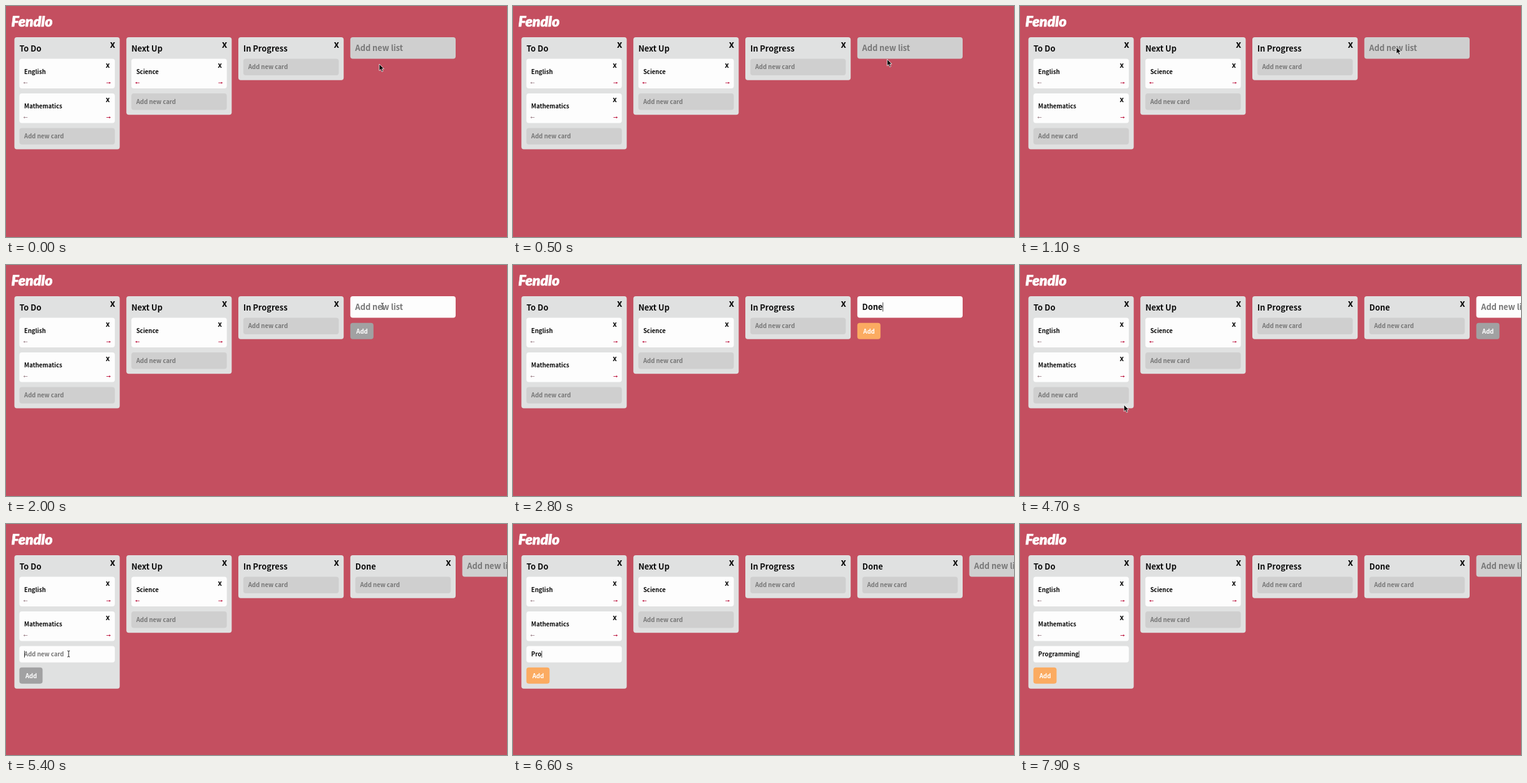
These frames come from a looping animation (800 by 370 pixels, 8 s). An HTML page:

```html
<!DOCTYPE html>
<html lang="en">
<head>
<meta charset="utf-8">
<title>Task board</title>
<style>
  html, body { margin: 0; width: 100%; height: 100%; overflow: hidden; background: #c44f60; }
  svg { display: block; width: 800px; height: 370px; }
  text { font-family: "Noto Sans CJK JP", "Noto Sans CJK SC", "Noto Sans CJK", "Open Sans", sans-serif; font-weight: 700; white-space: pre; }
  .logo { font: italic 900 23px Lato, sans-serif; fill: #fff; stroke: #fff; stroke-width: .7; stroke-linejoin: round; }
</style>
</head>
<body>
<svg id="stage" viewBox="0 0 800 370" xmlns="http://www.w3.org/2000/svg"></svg>
<script>
const LOOP = 8000, STEP = 100;
const LEFT = 13.4, PITCH = 178.8, WIDTH = 168.2;
const BIG = 12.8, SMALL = 9.55;
const INK = '#0b0b0b', HINT = '#777';
const FAMILY = '"Noto Sans CJK JP", "Noto Sans CJK SC", "Noto Sans CJK", "Open Sans", sans-serif';

const FOCUS_LIST = 1400, SUBMIT = 3100, FOCUS_CARD = 5100;
const LIST_KEYS = [2200, 2400, 2500, 2700];
const CARD_KEYS = [6200, 6400, 6600, 6700, 6800, 7000, 7100, 7300, 7400, 7500, 7700];

// time, x, y of the pointer
const PATH = [
  [0, 596, 93], [300, 596, 93], [1000, 601, 66], [3900, 601, 66],
  [4700, 166, 224], [5000, 100, 208], [8000, 100, 208]
];

const stage = document.getElementById('stage');
const ruler = document.createElement('canvas').getContext('2d');

const rect = (x, y, w, h, fill, r = 4) =>
  `<rect x="${x}" y="${y}" width="${w}" height="${h}" rx="${r}" fill="${fill}"/>`;
const label = (x, y, str, size, fill = INK, anchor = 'start') =>
  `<text x="${x}" y="${y}" font-size="${size}" fill="${fill}" text-anchor="${anchor}">${str}</text>`;
const line = (d, color, width = 1) =>
  `<path d="${d}" fill="none" stroke="${color}" stroke-width="${width}"/>`;

function measure(str, size) {
  ruler.font = `700 ${size}px ${FAMILY}`;
  return ruler.measureText(str).width;
}

const typed = (word, keys, t) => word.slice(0, keys.filter(k => k <= t).length);

// The caret restarts its blink at the last focus or key press.
function caretOn(t, start, keys) {
  const last = Math.max(start, ...keys.filter(k => k <= t));
  return t >= start && (t - last) % 1000 < 500;
}

function arrow(x, y, dir, color) {
  return line(`M${x - 3.2 * dir} ${y}H${x + 3 * dir}`, color, .9) +
    `<path d="M${x + 3.5 * dir} ${y}l${-2.3 * dir} -1.7v3.4z" fill="${color}"/>`;
}

function addButton(x, y, active) {
  return rect(x, y, 37, 26, active ? '#fbab61' : '#a1a1a2') +
    label(x + 9.5, y + 16.8, 'Add', SMALL, '#fff');
}

function field(x, y, w, h, size, hint, box) {
  const base = y + h / 2 + size * .37, text = box.text || '';
  let out = rect(x, y, w, h, box.focus ? '#fdfdfd' : '#cfcfcf') +
    label(x + 7.7, base, text || hint, size, text ? INK : HINT);
  if (box.caret) {
    const cx = x + 8.1 + measure(text, size);
    out += line(`M${cx} ${base - size * .95}V${base + size * .2}`, '#333', .9);
  }
  return out;
}

function card(x, y, title, first) {
  return rect(x, y, 152.4, 47.5, '#fdfdfd') +
    label(x + 7.7, y + 24.4, title, SMALL) +
    label(x + 141.2, y + 14.4, 'x', 11.6, INK, 'middle') +
    arrow(x + 9.8, y + 38.5, -1, first ? '#a58c93' : '#bd1740') +
    arrow(x + 142.2, y + 38.5, 1, '#bd1740');
}

function list(i, title, cards, box = {}) {
  const x = LEFT + i * PITCH, inner = x + 8, y = 84.6 + cards.length * 55.4;
  let out = rect(x, 50, WIDTH, y - 50 + 34.2 + (box.focus ? 34.2 : 0), '#e0e1e1') +
    label(x + 8, 72.8, title, BIG) +
    label(x + 156.7, 67, 'x', 15, INK, 'middle');
  cards.forEach((name, n) => out += card(inner, 84.6 + n * 55.4, name, i === 0));
  out += field(inner, y, 152.4, 26.4, SMALL, 'Add new card', box);
  if (box.focus) out += addButton(inner, y + 34.4, box.text);
  return out;
}

function newList(i, box) {
  const x = LEFT + i * PITCH;
  return field(x, 50, WIDTH, 34.5, BIG, 'Add new list', box) +
    (box.focus ? addButton(x, 92.7, box.text) : '');
}

function pointer(t) {
  if (t >= LIST_KEYS[0] && t < 4000 || t >= CARD_KEYS[0]) return '';
  const n = PATH.findIndex(p => p[0] > t);
  const [t0, x0, y0] = PATH[n - 1], [t1, x1, y1] = PATH[n];
  const u = (t - t0) / (t1 - t0), x = x0 + (x1 - x0) * u, y = y0 + (y1 - y0) * u;
  if (t >= 1200 && t < 4000 || t >= 5000) {
    const beam = `M${x - 2} ${y - 5}q2 0 2 1.5V${y + 3.5}q0 1.5 -2 1.5M${x + 2} ${y - 5}q-2 0 -2 1.5M${x} ${y + 3.5}q0 1.5 2 1.5`;
    return line(beam, '#fff', 1.8) + line(beam, '#222', 1);
  }
  return `<path transform="translate(${x} ${y})" d="M0 0V10.6L2.4 8.4L4.1 12.2L6 11.4L4.3 7.7H7.6Z" fill="#000" stroke="#fff" stroke-width=".8"/>`;
}

function render(t) {
  const done = t >= SUBMIT, onCard = t >= FOCUS_CARD;
  const listBox = {
    focus: t >= FOCUS_LIST && !onCard,
    text: done ? '' : typed('Done', LIST_KEYS, t),
    caret: !onCard && caretOn(t, done ? SUBMIT : FOCUS_LIST, done ? [] : LIST_KEYS)
  };
  const cardBox = {
    focus: onCard,
    text: typed('Programming', CARD_KEYS, t),
    caret: caretOn(t, FOCUS_CARD, CARD_KEYS)
  };
  stage.innerHTML = rect(0, 0, 800, 370, '#c44f60', 0) +
    '<text class="logo" x="8.5" y="33">Fendlo</text>' +
    list(0, 'To Do', ['English', 'Mathematics'], cardBox) +
    list(1, 'Next Up', ['Science']) +
    list(2, 'In Progress', []) +
    (done ? list(3, 'Done', []) : '') +
    newList(done ? 4 : 3, listBox) +
    pointer(t);
}

let shown = -1;
function tick(now) {
  const t = Math.floor(now % LOOP / STEP) * STEP;
  if (t !== shown) render(shown = t);
  requestAnimationFrame(tick);
}
render(0);
requestAnimationFrame(tick);
</script>
</body>
</html>
```
